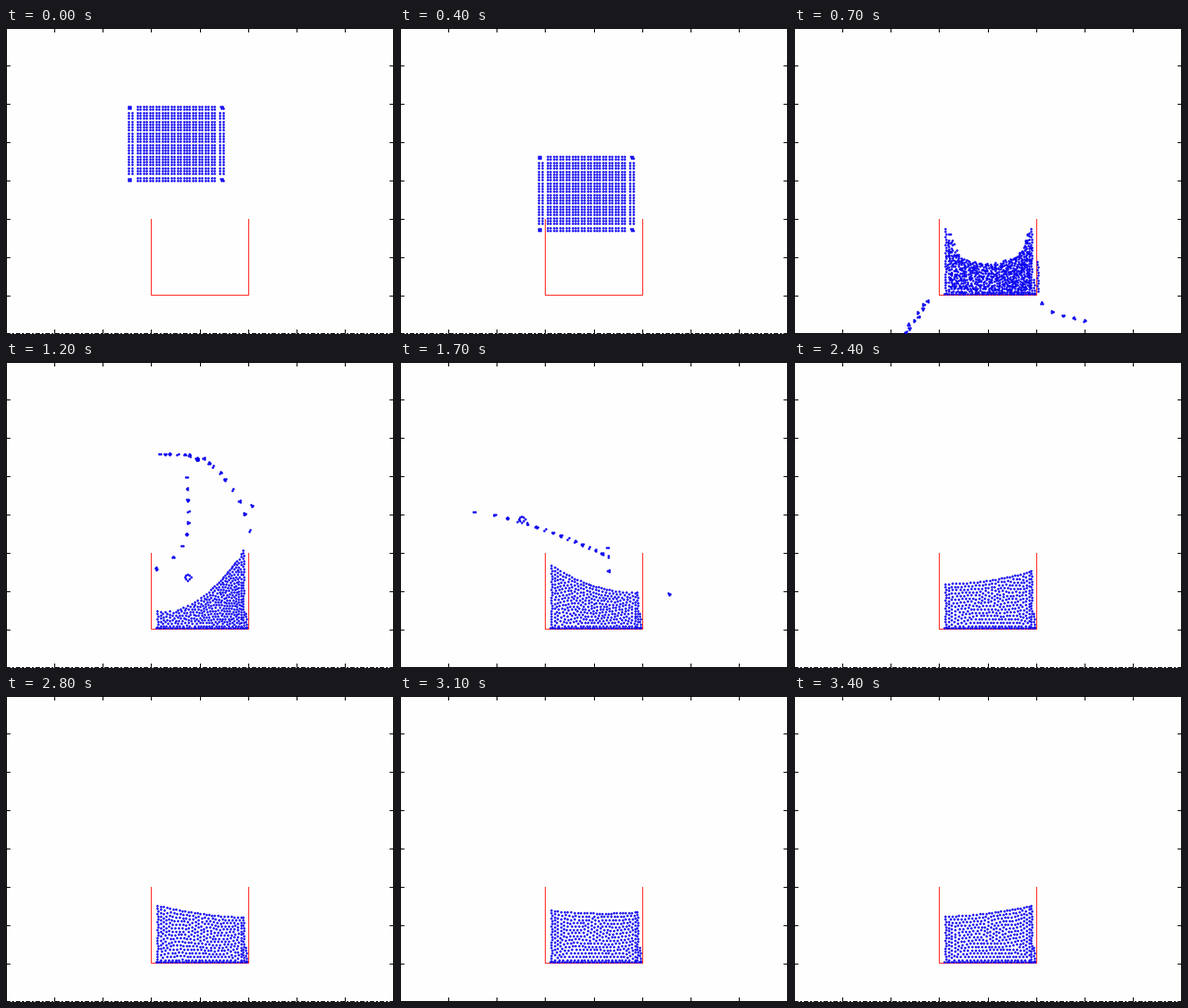
Recreate the animation shown at these times as a matplotlib script. Size 434 by 343 pixels, loop 3500 ms.

```python
import numpy as np
import matplotlib.pyplot as plt
from matplotlib.animation import FuncAnimation

W, H, DPI = 434, 343, 100
FRAMES, STEP = 35, 100
G = 700.0                                  # gravity, px/s^2
LEFT, RIGHT, RIM, FLOOR = 162.5, 271.5, 214, 299.5
BOTTOM = FLOOR - 1.5                       # lowest particle row
SPLASH, SLOSH, PERIOD = 0.7, 1.2, 1.1      # seconds
N = 370
rng = np.random.default_rng(4)


def surface(x, t):
    """Liquid level: a damped tilt, a sagging middle and two wall jets."""
    q = (np.asarray(x) - 217) / 50
    calm = np.exp(-max(t - SLOSH, 0) / 0.5)
    grow = np.clip((t - SPLASH) / 0.4, 0, 1)
    tilt = grow * (6 + 29 * calm) * np.cos(2 * np.pi * (t - SLOSH) / PERIOD)
    jet = 22 * np.exp(-(t - SPLASH) / 0.15 - ((np.abs(q) - 0.95) / 0.15) ** 2)
    return 243 + 22 * calm - tilt * q - (2 + 18 * calm) * q * q - jet


def grid(xs, ys):
    return np.stack(np.meshgrid(xs, ys), -1).reshape(-1, 2)


def ring(x, y, n=4, r=1.1, turn=0.0):
    a = turn + np.arange(n) * 2 * np.pi / n
    return np.stack([x + r * np.cos(a), y + r * np.sin(a)], 1)


def make_block():
    """Square of particles with its outer rows slightly detached."""
    cols, rows = np.linspace(147, 233, 26), np.linspace(95, 163, 22)
    corners = [ring(x, y, r=1.7, turn=0.6)
               for x in (138, 241.5) for y in (89, 170)]
    return np.vstack([grid(cols, rows), grid(cols, [87.5, 90.5, 167.5, 171]),
                      grid([137, 140.5, 238.5, 242.5], rows), *corners])


BLOCK = make_block()


def falling(t):
    return BLOCK + [45 * t, G / 2 * t * t]


# Body of liquid: particles carried by the surface, kept apart by repulsion
GX = np.linspace(171, 265, 95)


def column_mass(t):
    c = np.cumsum(BOTTOM - surface(GX, t))
    return c - c[0]


def place(uv, t):
    c = column_mass(t)
    x = np.interp(uv[:, 0] * c[-1], c, GX)
    return np.stack([x, BOTTOM - uv[:, 1] * (BOTTOM - surface(x, t))], 1)


def unplace(p, t):
    c = column_mass(t)
    u = np.interp(p[:, 0], GX, c) / c[-1]
    v = (BOTTOM - p[:, 1]) / (BOTTOM - surface(p[:, 0], t))
    return np.stack([u, v], 1)


def relax(p, t, rounds):
    gap = 1.1 * np.sqrt(1.155 * column_mass(t)[-1] / N)
    for _ in range(rounds):
        d = p[:, None] - p[None]
        r = np.hypot(d[..., 0], d[..., 1]) + 1e-6
        push = np.clip(gap - r, 0, None) * 0.25 / r
        p = p + (d * push[..., None]).sum(1)
        p[:, 0] = np.clip(p[:, 0], 172.5, 263)
        p[:, 1] = np.clip(p[:, 1], surface(p[:, 0], t), BOTTOM - 2.5)
    return p


def simulate():
    uv, body = rng.random((N, 2)), {}
    first = round(SPLASH * 1000 / STEP)
    for f in range(first, FRAMES):
        t = f * STEP / 1000
        body[f] = relax(place(uv, t), t, 50 if f == first else 14)
        uv = unplace(body[f], t)
    return body


BODY = simulate()
TWIN = ring(0, 0, N, 1)[rng.permutation(N)]
ROUGH = rng.uniform(-0.7, 0.7, 60)


def wall(x, top, bottom=BOTTOM, gap=3.0):
    y = np.arange(top, bottom, gap)
    return np.stack([x + ROUGH[:len(y)], y], 1)


def liquid(f, t):
    p = BODY[f]
    floor = grid(np.arange(168, 270, 2.6), [BOTTOM])
    parts = [p, floor, wall(169.5, surface(169, t)),
             wall(265.5, surface(266, t)), wall(268.5, 282)]
    spread = 2.2 * (SLOSH - t) / (SLOSH - SPLASH)
    if spread > 0:                         # particles start in loose pairs
        parts.append(p + spread * TWIN)
    return parts


# Droplets: each is a ballistic path, position at t0 plus velocity
def ballistic(t, t0, x, y, vx, vy):
    s = t - t0
    return x + vx * s, y + vy * s + G / 2 * s * s


def left_jet():
    for s in np.linspace(0, 1, 9):
        yield SPLASH, 172, 225, 60 + 12 * s - 80 * s ** 5, -367 + 205 * s


def right_jet():
    """Arc thrown off the right wall, aimed at where it is 0.5 s later."""
    for s in np.linspace(0, 1, 16):
        dx, dy = rng.uniform(-2.5, 2.5, 2)
        x, y = 172 + 102 * s + dx, 103 + 85 * s ** 3.5 + dy * s
        x2, y2 = 83 + 150 * s ** 0.7, 168 + 50 * s
        yield SLOSH, x, y, (x2 - x) * 2, (y2 - y) * 2 - G / 4
    yield SLOSH, 275, 161, 52, 23


DROPS = [*left_jet(), *right_jet()]
BUBBLES = [(SPLASH, 172, 225, 62, -143), (SLOSH, 214, 109, -156, -41)]


def droplets(t):
    parts = []

    def add(path, n, r, turn=0):
        x, y = ballistic(t, *path)
        if t < SLOSH - 0.05:               # still riding up the wall
            x = min(x, 267)
        inside = LEFT < x < RIGHT
        if y < (surface(x, t) - 2 if inside else H + 3):
            parts.append(ring(x, y, n, r, turn))

    if t > SPLASH + 0.05:
        for i, path in enumerate(DROPS):
            add(path, 2 + i % 3, 1.1, i)
        for path in BUBBLES:
            add(path, 8, min(7 * (t - path[0]) + 0.8, 3.5))
    return parts


def spill(t):
    """Particles that missed the box and drop past it."""
    s = t - SPLASH
    fall = 490 * s + G / 2 * s * s
    a, b = np.linspace(0, 1, 9), np.linspace(0, 1, 5)
    x = np.r_[150 - 27 * a + 4 * ROUGH[:9], 277 + 48 * b]
    y = np.r_[306 + 35 * a, 308 + 20 * np.sqrt(b)]
    parts = [ring(px + (px - 217) * s, py + fall, 3, turn=px)
             for px, py in zip(x, y)]
    return parts + [wall(272.5, 262) + [0, fall]]


def particles(f):
    t = f * STEP / 1000
    if f not in BODY:
        return falling(t)
    return np.vstack(liquid(f, t) + droplets(t) + spill(t))


fig = plt.figure(figsize=(W / DPI, H / DPI), dpi=DPI, facecolor="#fefefe")
ax = fig.add_axes([0, 0, 1, 1])
ax.set_xlim(0, W)
ax.set_ylim(H, 0)
ax.axis("off")
PX = 72 / DPI


def line(x, y, color="black", **kw):
    return ax.plot(x, y, color=color, lw=PX, solid_capstyle="butt",
                   solid_joinstyle="miter", snap=False, **kw)[0]


line([0.5, 0.5, W - 0.5, W - 0.5], [H, 0.5, 0.5, H])
for i in range(1, 8):
    tx, ty = i * W // 8 + 0.5, i * H // 8 + 0.5
    for y in (0, H - 5):
        line([tx, tx], [y, y + 5])
    for x in (0, W - 5):
        line([x, x + 5], [ty, ty])

base = line([0, W], [H - 0.5, H - 0.5])
line([LEFT, LEFT, RIGHT, RIGHT], [RIM, FLOOR, FLOOR, RIM], color="#ff2a20")
dots, = ax.plot([], [], "o", color="#0800f0", ms=2.6 * PX, mew=0)


def draw(f):
    p = particles(f)
    dots.set_data(p[:, 0], p[:, 1])
    base.set_linestyle("-" if f % 2 else (0, (5, 2, 2, 2)))
    return dots, base


anim = FuncAnimation(fig, draw, frames=FRAMES, init_func=lambda: draw(0),
                     interval=STEP, repeat=True, repeat_delay=0, blit=False)
plt.show()
```
